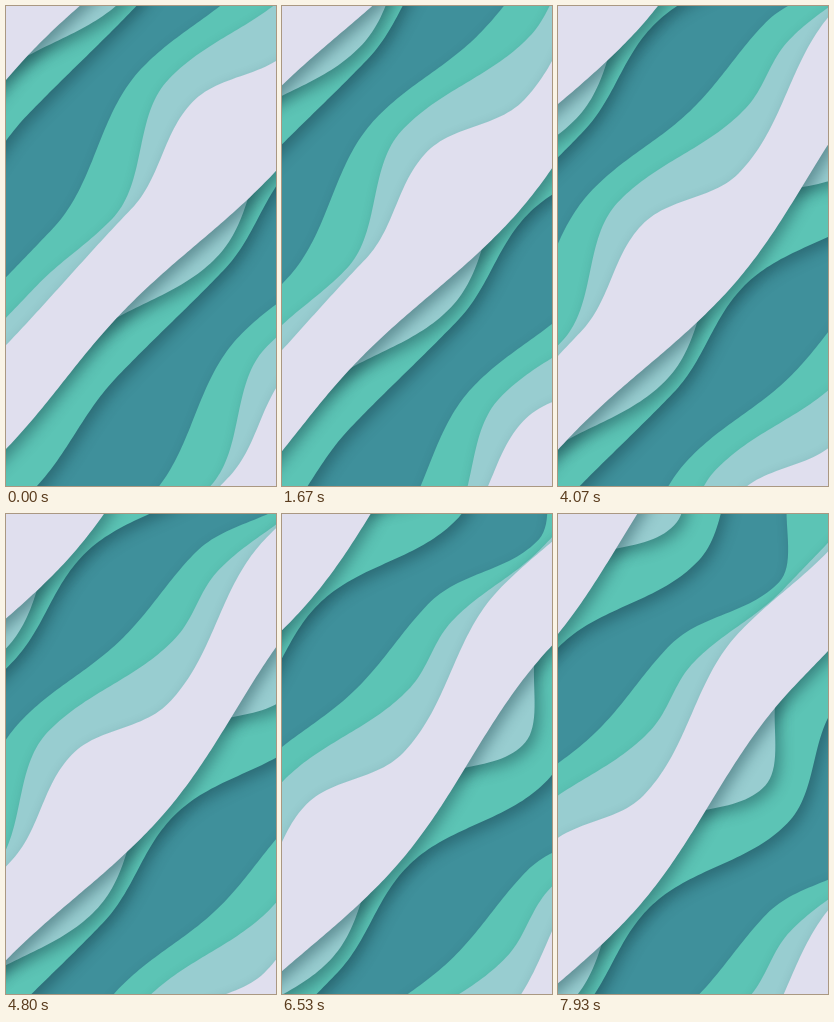
Animation of 270 by 480 pixels, one loop 8 s. Source, as an HTML page with a canvas:

```html
<!DOCTYPE html>
<html lang="en">
<head>
<meta charset="utf-8">
<title>Drifting paper waves</title>
<style>
  html, body { margin: 0; height: 100%; overflow: hidden; background: #3f909b; }
  canvas { display: block; width: 100vw; height: 100vh; }
</style>
</head>
<body>
<canvas id="stage" width="270" height="480"></canvas>
<script>
const ctx = document.getElementById('stage').getContext('2d');
const LOOP = 8, FPS = 15;
const SPEED = 39.2;  // drift along the bands, px per second
const RISE = 22;     // drift across the bands over one loop, px

// Bands repeat across the diagonal, each one shifted along it.
const BAND_SHIFT = 126, TOP_GAP = 256, BOTTOM_GAP = 246;

// Every edge is a wave given by its crests and troughs: [along, across].
const layers = [
  {
    color: '#5cc4b5',
    top: [[-500, 135], [-412, 196], [-290, 161], [-185, 168], [-50, 152], [130, 199]],
    bottom: [[-370, 322], [-245, 369], [-85, 328], [40, 351], [190, 348], [330, 366]]
  },
  {
    color: '#98cdd0',
    top: [[-410, 204], [-295, 190], [-215, 206], [-60, 179], [80, 235], [180, 227]],
    bottom: [[-350, 265], [-255, 327], [-140, 275], [35, 337], [200, 298]]
  },
  {
    color: '#e0dfee',
    top: [[-470, 210], [-350, 202], [-165, 246], [-60, 212], [60, 242], [250, 246]],
    bottom: [[-350, 279], [-60, 320], [140, 307], [320, 318]]
  }
];

const swing = f => (1 - Math.cos(Math.PI * f)) / 2;

function wave(points, s) {
  const next = points.findIndex(([along]) => along > s);
  if (next === 0) return points[0][1];
  if (next < 0) return points[points.length - 1][1];
  const [s0, v0] = points[next - 1], [s1, v1] = points[next];
  return v0 + (v1 - v0) * swing((s - s0) / (s1 - s0));
}

function drawBand({ color, top, bottom }, band, seconds) {
  const along = u => u - band * BAND_SHIFT - SPEED * seconds;
  const rise = RISE * (seconds / LOOP - 0.5);
  ctx.beginPath();
  for (let u = -260; u <= 420; u += 4)
    ctx.lineTo(u, wave(top, along(u)) + rise + band * TOP_GAP);
  for (let u = 420; u >= -260; u -= 4)
    ctx.lineTo(u, wave(bottom, along(u)) + rise + band * BOTTOM_GAP);
  ctx.fillStyle = color;
  ctx.fill();
}

function draw(seconds) {
  ctx.setTransform(1, 0, 0, 1, 0, 0);
  ctx.shadowColor = 'transparent';
  ctx.fillStyle = '#3f909b';
  ctx.fillRect(0, 0, 270, 480);
  // u runs down-left along the bands, v runs down-right across them.
  ctx.setTransform(-0.693, 0.721, 0.721, 0.693, 0, 0);
  ctx.shadowColor = 'rgba(20, 60, 70, 0.42)';
  ctx.shadowBlur = 14;
  ctx.shadowOffsetX = 5;
  ctx.shadowOffsetY = 6;
  for (const layer of layers)
    for (let band = -1; band <= 1; band++) drawBand(layer, band, seconds);
}

const start = performance.now();
function tick() {
  const elapsed = (performance.now() - start) / 1000 % LOOP;
  draw(Math.floor(elapsed * FPS) / FPS);
  requestAnimationFrame(tick);
}
tick();
</script>
</body>
</html>
```
